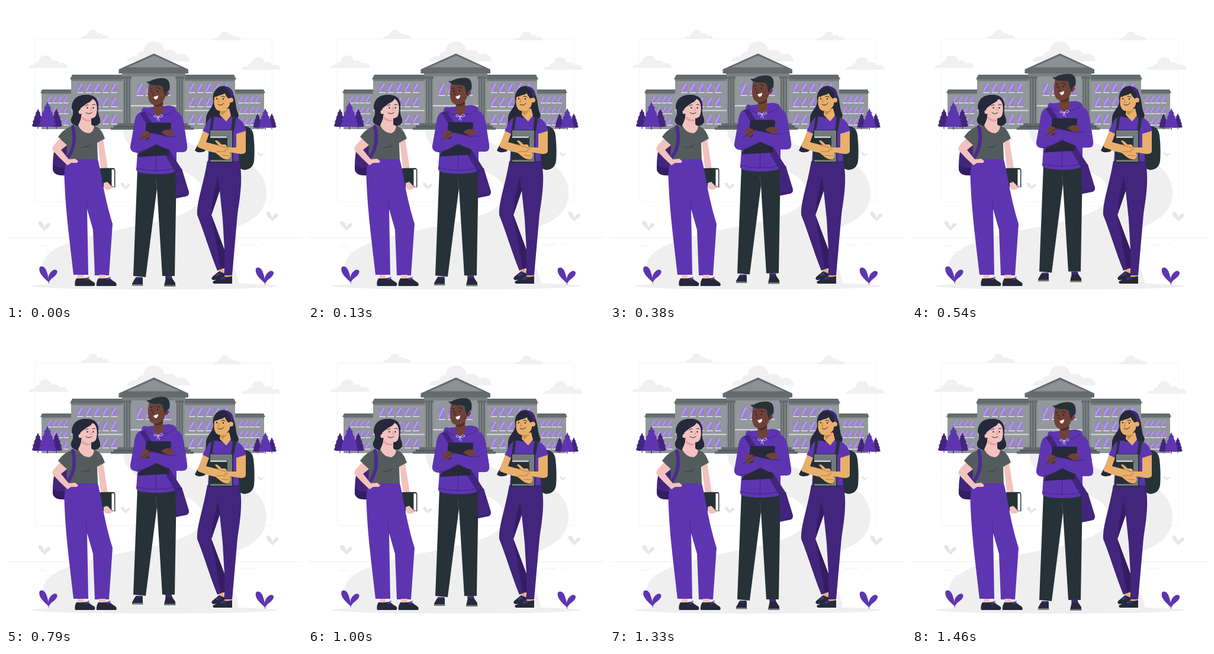
Recreate the animation shown at these times as an HTML page. Size 500 px wide and 500 px high, loop 1.5 s.

```html
<!DOCTYPE html>
<html lang="en">
<head>
<meta charset="utf-8">
<title>Students on campus</title>
<style>
  html, body { margin: 0; width: 100%; height: 100%; overflow: hidden; background: #fff; }
  svg { display: block; width: 100%; height: 100%; }
  .purple { fill: #5e35b1; }
  .deep { fill: #42257c; }
  .night { fill: #341d62; }
  .dark { fill: #263238; }
  .hair { fill: #25293a; }
  .rose { fill: #f2c2be; }
  .brown { fill: #6f4238; }
  .tan { fill: #e9af6c; }
  .mist { fill: #efefef; }
  .cloud { fill: #f0f0f0; }
  .leaf { fill: #e6e6e6; }
  .wall { fill: #92989b; }
  .roof { fill: #646c6e; }
  .line { fill: none; stroke-linecap: round; stroke-linejoin: round; }
</style>
</head>
<body>
<svg viewBox="0 0 500 500">
  <defs>
    <path id="cloud" d="M0 21C2 16 7 15 11 16C12 10 16 11 18 10C18 3 24 0 29 0C36 0 40 5 40 10C45 7 52 9 54 14C60 11 66 14 67 21Z"/>
    <g id="plant">
      <path d="M0 0C-6-6-17-14-15-24C-12-29-5-25-3-18C-1-12 1-6 0 0Z"/>
      <path d="M0 0C-1-8 1-15 7-19C11-22 16-20 15-16C13-9 5-7 2-1Z"/>
      <path d="M-.6-3H.8L1.2 3H.4Z"/>
    </g>
    <path id="tree" d="M0-45Q3-38 9-34L6-34Q9-27 14-24L11-24Q14-17 18-14L15-14Q17-8 20-5Q10-1 1.500-3L1 2H-1L-1.500-3Q-10-1-20-5Q-17-8-15-14L-18-14Q-14-17-11-24L-14-24Q-9-27-6-34L-9-34Q-3-38 0-45Z"/>
    <g id="lace" class="line" stroke="#5e35b1" stroke-width="1">
      <path d="M0 2L5-2Q8-3 5 0L1 3M0 0L3 3M4 0L8 2"/>
    </g>
  </defs>

  <!-- backdrop -->
  <path class="line" stroke="#f4f4f4" d="M238 55.500H53Q49 55.500 49 60V326Q49 330.500 53 330.500H445Q449.500 330.500 449.500 326V60Q449.500 55.500 445 55.500H261"/>
  <path class="line" stroke="#f0f0f0" d="M0 391.500H500M53 405.500H67M69 415H96M396 403.500H419M431 402.500H437"/>
  <path class="mist" d="M198 208H292C300 240 340 241 378 252C420 264 440 287 440 316C440 344 421 360 397 370C362 386 360 410 382 438Q392 453 394 473H78C68 466 62 455 62 440C62 395 180 382 250 365C296 355 332 342 332 315C332 289 299 278 270 270C226 257 198 235 198 208Z"/>
  <ellipse class="mist" cx="250" cy="473" rx="209" ry="6"/>
  <g class="cloud">
    <use href="#cloud" transform="translate(37.500 83.500)"/>
    <use href="#cloud" transform="translate(126 40) scale(.71)"/>
    <use href="#cloud" transform="translate(204 60) scale(1.590)"/>
    <use href="#cloud" transform="translate(349 43) scale(.71)"/>
    <use href="#cloud" transform="translate(397 86.500)"/>
  </g>

  <!-- building -->
  <path class="wall" d="M60 146H110V208H60ZM387 146H436V208H387Z"/>
  <path class="wall" d="M110 123H199V208H110ZM299 123H387V208H299Z"/>
  <path class="roof" d="M61 141H110V147H58ZM387 141H435L438 147H387ZM112 116H199V124H108ZM299 116H385L389 124H299Z"/>
  <path fill="#777e80" d="M110 124H199V127H110ZM299 124H387V127H299ZM60 147H110V149H60ZM387 147H436V149H387Z"/>
  <path fill="#d5d7d8" d="M110 175.500H199V177.500H110ZM299 175.500H387V177.500H299Z"/>
  <path fill="#8b9193" d="M197 112H302V200H197Z"/>
  <path class="wall" d="M212 119H287V198H212Z"/>
  <path class="roof" d="M250 80.300L308 107V114H190.500V107Z"/>
  <path fill="#8c9294" d="M250 84L295 103.500H205Z"/>
  <path fill="#7a8183" d="M196 114H303V119H196Z"/>
  <path fill="#dddfe0" d="M211 167.500H288V169.500H211Z"/>
  <g id="windows"></g>
  <path class="roof" d="M197 119H212V123H197ZM286 119H301V123H286ZM199 123H210V198H199ZM288 123H299V198H288Z"/>
  <path class="line" stroke="#858c8e" stroke-width="1.300" d="M202 123V198M206.500 123V198M291 123V198M295.500 123V198"/>
  <path class="roof" d="M188 198H307V203H188ZM177 205H317V209H177Z"/>
  <path fill="#555d5f" d="M182 202H312V205.500H182Z"/>

  <!-- greenery -->
  <g class="deep">
    <use href="#tree" transform="translate(54 206) scale(.52 .72)"/>
    <use href="#tree" transform="translate(85 206) scale(.52 .72)"/>
    <use href="#tree" transform="translate(425 207) scale(.4 .57)"/>
    <use href="#tree" transform="translate(449 207) scale(.4 .57)"/>
  </g>
  <g class="purple">
    <use href="#tree" transform="translate(70 206.500) scale(.75 1)"/>
    <use href="#tree" transform="translate(438 207.500) scale(.58 .77)"/>
  </g>
  <g class="leaf">
    <use href="#plant" transform="translate(65 379) scale(.68 .6)"/>
    <use href="#plant" transform="translate(202 309.500) scale(.52 .43)"/>
    <use href="#plant" transform="translate(430 254) scale(.34 .27)"/>
    <use href="#plant" transform="translate(450 363) scale(.68 .6)"/>
  </g>
  <g class="purple">
    <use href="#plant" transform="translate(71.500 466)"/>
    <use href="#plant" transform="translate(437 468)"/>
  </g>

  <!-- student on the left -->
  <g>
    <path class="deep" d="M92 225C80 236 79 255 79 275Q80 287 101 286L116 260 109 224Z"/>
    <path class="night" d="M79 268Q89 276 104 272L101 286Q80 288 79 275Z"/>
    <path class="hair" d="M111 172C111 155 124 149 137 150C151 150 158 159 156 174C154 183 160 188 159 196C156 203 147 203 140 203L120 203C110 200 107 194 112 186Q115 180 111 172Z"/>
    <path class="rose" d="M154 224H164L170 262 175 299 164 302Z"/>
    <path class="dark" d="M157 275Q158 274 161 274H182V306H160Q157 306 157 303Z"/>
    <path fill="#fff" d="M178.500 276H182V305H178.500Z"/>
    <path class="line" stroke="#263238" stroke-width="1.500" d="M165 274.500H181Q183.700 275 183.700 278V306"/>
    <path class="rose" d="M165 299L171 297 176 302 179 306Q179 310 173 310Q166 311 165 305Z"/>
    <path fill="#535b5d" d="M112 203C100 206 94 213 88 221L103 235 102 260H155L154 231 167 224C163 212 158 205 150 203Z"/>
    <path class="rose" d="M128 182L122 202Q129 215 141 215Q148 212 149 203L144 200V184Z"/>
    <path fill="#e4a09d" d="M129 186Q134 193 143 192V194Q134 197 128 190Z"/>
    <path class="hair" d="M150 176C153 186 161 188 159 197Q153 205 145 201Q148 192 146 186Z"/>
    <path class="rose" d="M125 166C134 167 143 163 146 157C155 160 155 177 152 185C149 192 137 191 130 184Q124 181 125 166Z"/>
    <path class="hair" d="M125 180C123 170 131 172 143 158Q136 154 125 158L115 176 112 194 121 202Q128 192 127 183Z"/>
    <circle class="rose" cx="126" cy="179" r="3.500"/>
    <path class="line" stroke="#25293a" stroke-width="1" d="M134 169Q136 166 139 167M146 167Q149 165 151 167M135 180Q140 184 145 180"/>
    <path class="line" stroke="#e08e8c" stroke-width="1" d="M143 171L145 176H142"/>
    <circle class="hair" cx="137.500" cy="172" r="1.200"/><circle class="hair" cx="147.500" cy="172" r="1.200"/>
    <path class="line" stroke="#394143" d="M127 239Q136 239 143 234M135 238L140 238"/>
    <path class="purple" d="M114 259H155C162 285 164 315 180 368L174 455H150L147 378 137 343 139 454H114C108 400 101 350 99 300Q97 275 103 259Z"/>
    <path class="line" stroke="#4a2892" d="M137 343L135 324"/>
    <path class="line" stroke="#4b2a90" stroke-width="6" d="M113 204C117 222 116 240 105 255"/>
    <path class="rose" d="M91 224L103 235 93 243 106 259 117 258 122 262 120 265 110 265 104 269C96 262 86 252 79 244Q77 240 81 235Z"/>
    <path class="rose" d="M121 454H131V462H121ZM157 454H168V462H157Z"/>
    <path class="hair" d="M119 460Q130 461 136 459L149 467Q152 470 149 473H117Q115 466 119 460ZM156 460Q166 461 173 459L185 467Q188 470 186 473H153Q152 466 156 460Z"/>
    <use href="#lace" x="134" y="460"/><use href="#lace" x="170" y="460"/>
  </g>

  <!-- student on the right -->
  <g>
    <path class="dark" d="M391 205C404 200 416 203 418 218C420 235 420 250 419 262Q417 276 402 277L388 272Z"/>
    <path class="hair" d="M368 135C355 135 348 147 350 160C350 173 339 176 338 190C338 210 329 224 319 244Q323 249 335 246L365 210 385 195Q394 193 392 182C386 172 391 139 368 135Z"/>
    <path class="purple" d="M363 189C351 184 345 188 341 194L332 211 344 217 341 263H394L390 217 406 211C402 196 397 190 380 185Z"/>
    <path class="hair" d="M378 160L386 156Q387 172 393 184Q390 191 380 187Z"/>
    <path class="dark" d="M383 185L389 188 385 211H380ZM347 187L352 185 348 211H344Z"/>
    <path class="tan" d="M362 175L361 184 372 195 380 185 377 173Z"/>
    <path fill="#ca8a47" d="M362 177Q369 179 375 175L365 185Z"/>
    <path class="tan" d="M353 150C361 153 367 149 372 146C379 150 379 160 378 166C376 174 366 179 359 177C351 174 350 162 353 150Z"/>
    <path class="hair" d="M350 154Q354 142 367 138Q381 140 382 159L377 157Q371 153 369 145Q362 152 350 154Z"/>
    <path class="deep" d="M366 135.500C379 135 387 144 383 155L379 154Q380 142 366 135.500Z"/>
    <circle class="tan" cx="380" cy="159" r="4"/>
    <path class="line" stroke="#25293a" stroke-width="1" d="M353 153L357 152M364 153Q367 151 370 154M358 166Q363 170 368 164"/>
    <path class="line" stroke="#c47f3f" stroke-width="1" d="M360 157L358 162H361"/>
    <circle class="hair" cx="356" cy="156.500" r="1.200"/><circle class="hair" cx="367" cy="157" r="1.200"/>
    <path class="deep" d="M340 262H394C401 290 395 325 391 352L382 455H368L369 443 357 447C344 415 335 383 323 353C322 330 333 304 340 262ZM361 312L347 353 369 412 366 360Z"/>
    <path class="night" d="M358 289L361 312 347 353Q349 320 358 289ZM347 353L369 412V443L363 445Z"/>
    <path class="dark" d="M343 211Q343 209 346 209H381Q384 209 384 212V265H343Z"/>
    <path fill="#747b7d" d="M345 210H382V263H345Z"/>
    <path class="dark" d="M345 220H374V260H345Z"/>
    <path fill="#fff" d="M345 220.500H373V222.500H345Z"/>
    <path class="tan" d="M389 216L405 211 405 246Q404 250 396 250L378 247 380 253 377 258Q371 261 364 256L354 248 341 245 325 239Q322 237 325 232L333 211 343 216 338 230 353 234 359 235 353 228Q355 225 360 230L364 234 371 234 374 239 389 239Z"/>
    <path class="line" stroke="#b87a3b" stroke-width="1" d="M356 235L373 240M356 246L371 246M369 244L375 242M365 252L377 253"/>
    <path class="tan" d="M360 446L367 443 368 451 361 454ZM369 455H380V462H369Z"/>
    <path class="hair" d="M360 448L369 452V461L350 463Q345 461 349 457ZM367 457Q375 459 382 456L382 469H351Q347 466 352 464Z"/>
    <use href="#lace" x="355" y="453"/><use href="#lace" x="363" y="459"/>
  </g>

  <!-- student in the middle -->
  <g id="hopper">
    <path class="dark" d="M222 276H288L285 456H264L255 308 236 458 215 456Z"/>
    <path class="line" stroke="#475156" d="M255 308L253 291"/>
    <path class="deep" d="M219 458H230L231 464H218ZM269 456H280L281 463H270Z"/>
    <path class="hair" d="M218 460Q225 463 231 459V472H213V469ZM270 459Q275 462 280 459L286 468V473H267Z"/>
    <path fill="#737b80" d="M213 470H231.500V472.700H213ZM267 471.500H286.500V474H267Z"/>
    <path class="purple" d="M238 172C230 169 229 175 229 179C218 181 217 194 216 205L210 237Q210 247 222 248L220 277Q222 284 255 284Q285 284 288 277L288 247 303 246Q307 243 306 236L300 196Q297 181 288 178Q289 169 275 168Z"/>
    <path class="line" stroke="#42257c" d="M220 274Q254 282 288 274M253.500 252V279M234 177Q247 189 261 185Q278 184 284 176"/>
    <path class="brown" d="M250 160L249 181Q257 188 266 180L265 158Z"/>
    <path fill="#4e2c26" d="M250 164Q257 170 265 160V165Q258 173 250 168Z"/>
    <path class="brown" d="M242 131C250 134 261 132 266 136L270 145Q275 141 275 147Q274 153 269 153C267 163 258 168 250 167C239 165 238 148 242 131Z"/>
    <path class="dark" d="M237 127Q241 129 247 125Q258 121 267 122Q279 124 276 142L271 145 269 152Q266 146 265 137Q262 133 254 134Q240 134 237 127Z"/>
    <path fill="#fff" d="M249 154L257 151Q257 158 252 158Z"/>
    <path class="line" stroke="#25293a" stroke-width="1.200" d="M243 140L247 139M254 138Q257 137 260 140"/>
    <path class="line" stroke="#48271f" d="M249 145L247 150H250"/>
    <ellipse class="hair" cx="246" cy="144" rx="1.200" ry="1.600"/><ellipse class="hair" cx="256" cy="143.500" rx="1.200" ry="1.600"/>
    <circle cx="274.500" cy="151" r=".8" fill="#ddd"/>
    <path class="line" stroke="#d7cfee" stroke-width="1" d="M257 187Q249 182 250 187Q252 189 257 187Q264 181 265 186Q262 189 257 187L255 193M257 187L259 194"/>
    <path class="deep" d="M226 181L234 178 297 276 288 284Z"/>
    <path class="deep" d="M286 277L297 275 309 314Q310 321 302 322L287 325Z"/>
    <path class="line" stroke="#341d62" stroke-width=".8" d="M287 279L297 276M287 322L303 319"/>
    <path class="hair" d="M237 197H276Q279 197 279 200L275 252 222 255 233 235Z"/>
    <path class="brown" d="M225 225L229 213Q236 209 242 213L246 219 231 228ZM262 214Q270 206 281 210L284 216 275 221Z"/>
    <path class="purple" d="M300 197L306 236Q307 246 298 247Q282 246 265 239L240 227 245 214 273 220 288 221Z"/>
    <path class="purple" d="M216 203L231 219 226 228 244 224 256 232 236 243Q223 250 214 246Q208 242 211 234Z"/>
    <path class="line" stroke="#42257c" d="M225 227L244 214L275 221L289 220M221 247Q238 243 255 234"/>
  </g>
</svg>
<script>
  const windowLayer = document.getElementById('windows');
  const hopper = document.getElementById('hopper');

  const pane = (x, y, w, h) => `
    <rect x="${x}" y="${y}" width="${w}" height="${h}" fill="#9c80d4"/>
    <path d="M${x} ${y + h * .7}L${x + w * .7} ${y}H${x + w}L${x} ${y + h}Z" fill="#b9a3e3"/>
    <rect x="${x - 1}" y="${y + h}" width="${w + 2}" height="1.500" fill="#e4e1ea"/>`;

  function paneGrid(x, cols, gap, rows, w, h) {
    let markup = '';
    for (const y of rows)
      for (let i = 0; i < cols; i++) markup += pane(x + i * gap, y, w, h);
    return markup;
  }

  const wingRows = [131, 155, 184];
  const endRows = [153, 171, 190.5];
  windowLayer.innerHTML =
    paneGrid(121.5, 5, 14.2, wingRows, 8.5, 14.5) +
    paneGrid(310, 5, 14.2, wingRows, 8.5, 14.5) +
    paneGrid(70.5, 4, 9.3, endRows, 6, 10) +
    paneGrid(394, 4, 9.3, endRows, 6, 10) +
    paneGrid(221.5, 4, 15.5, [131], 9.5, 19.5);

  const LOOP = 1500, LIFT = 9;

  function draw() {
    const phase = performance.now() % LOOP / LOOP;
    const y = -LIFT * (1 - Math.cos(2 * Math.PI * phase)) / 2;
    hopper.setAttribute('transform', `translate(0 ${y.toFixed(2)})`);
    requestAnimationFrame(draw);
  }
  draw();
</script>
</body>
</html>
```
